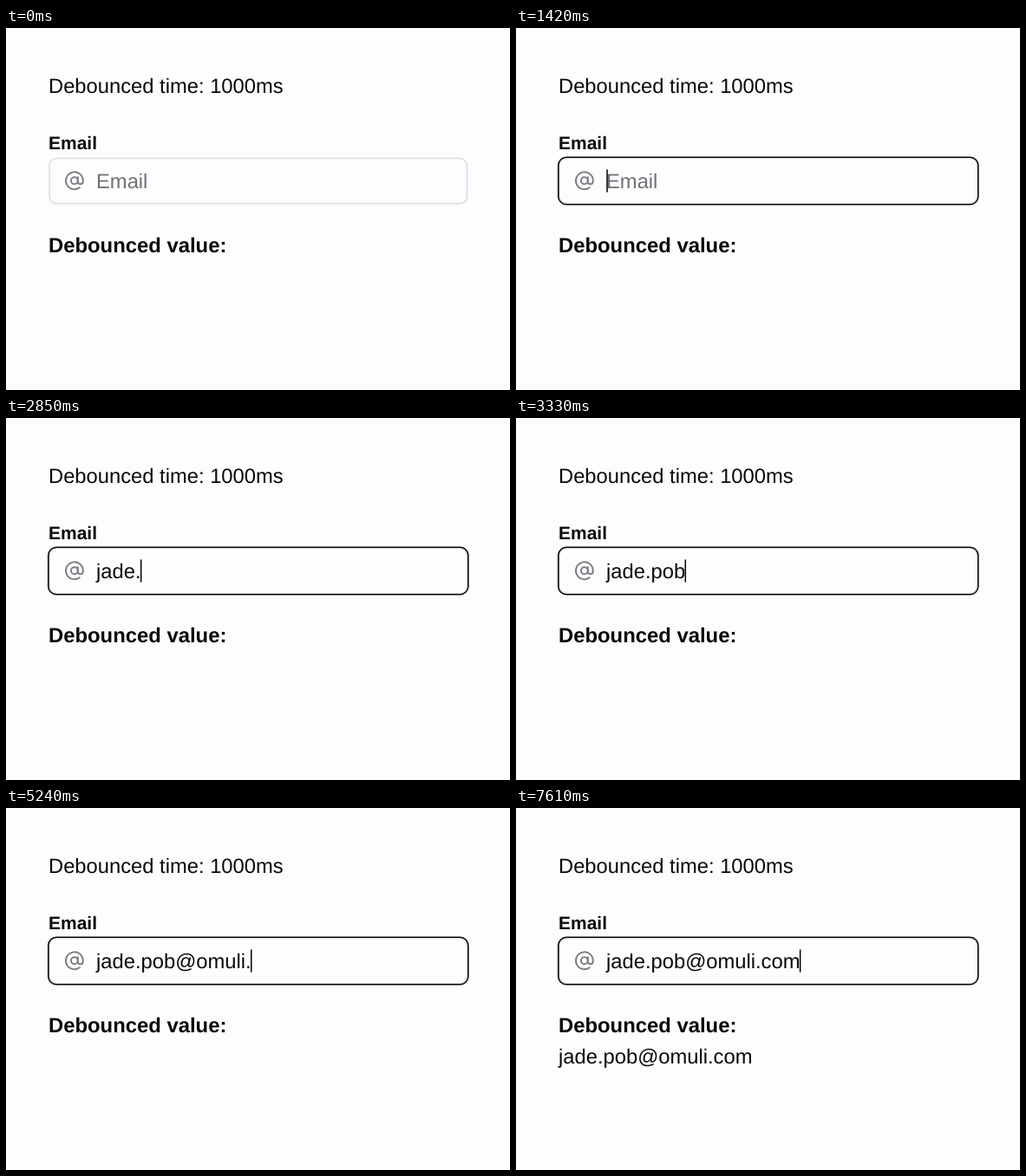
An HTML page for the animation above (8 s loop, 581 by 418 pixels).

```html
<!DOCTYPE html>
<html lang="en">
<head>
<meta charset="utf-8">
<title>Debounced input</title>
<style>
  html, body { margin: 0; width: 100%; height: 100%; overflow: hidden; background: #fdfcff; }
  svg { display: block; }
  text {
    font: 23.75px "Liberation Sans", Arial, sans-serif;
    font-kerning: none;
    text-rendering: geometricPrecision;
    fill: #09090b;
  }
  .bold { font-weight: 700; font-size: 23.85px; }
  .label { font-weight: 700; font-size: 21px; }
  #hint { fill: #717074; }
  .field { fill: #fdfcff; stroke: #dddce0; stroke-width: 1.5; filter: drop-shadow(0 1.5px 1.2px #0000000d); }
  #ring { fill: none; stroke: #09090b; stroke-width: 1.6; }
  .icon { fill: none; stroke: #807f83; stroke-width: 2; stroke-linecap: round; stroke-linejoin: round; }
</style>
</head>
<body>
<svg width="581" height="418" viewBox="0 0 581 418">
  <text x="49" y="75">Debounced time: 1000ms</text>
  <text x="49" y="140.3" class="label">Email</text>
  <rect class="field" x="50.2" y="150.6" width="481.2" height="51.8" rx="8"/>
  <rect id="ring" x="48.8" y="149.2" width="484" height="54.6" rx="9.4"/>
  <g class="icon" transform="translate(67 164.4) scale(.99)">
    <circle cx="12" cy="12" r="4"/>
    <path d="M16 8v5a3 3 0 0 0 6 0v-1a10 10 0 1 0-4 8"/>
  </g>
  <text id="hint" x="104" y="184.8">Email</text>
  <text id="typed" x="104" y="184.8"></text>
  <rect id="caret" y="163.4" width="1.5" height="26.2"/>
  <text x="49" y="259" class="bold">Debounced value:</text>
  <text id="result" x="49" y="294.6"></text>
</svg>
<script>
  const LOOP = 8000, FOCUS = 450, SETTLED = 6610;
  const email = "jade.pob@omuli.com";
  const keyTimes = [2180, 2270, 2450, 2610, 2850, 3060, 3180, 3330, 3790,
                    4390, 4610, 4730, 4850, 5030, 5240, 5420, 5515, 5610];
  // The caret switches between shown and hidden at each of these times.
  const blinks = [FOCUS, 940, 1420, 1940, 2180, 4300, 4390, 6120, SETTLED, 7120, 7610];

  const [ring, hint, typed, caret, result] =
    ["ring", "hint", "typed", "caret", "result"].map(id => document.getElementById(id));
  const passed = (times, t) => times.filter(time => time <= t).length;
  const show = (el, on) => el.setAttribute("visibility", on ? "visible" : "hidden");

  function draw() {
    const t = performance.now() % LOOP;
    const count = passed(keyTimes, t);
    typed.textContent = email.slice(0, count);
    result.textContent = t >= SETTLED ? email : "";
    const end = count ? typed.getComputedTextLength() : 0;
    caret.setAttribute("x", Math.max(104.3, 103.4 + end));
    show(caret, passed(blinks, t) % 2);
    show(ring, t >= FOCUS);
    show(hint, !count);
    requestAnimationFrame(draw);
  }
  draw();
</script>
</body>
</html>
```
